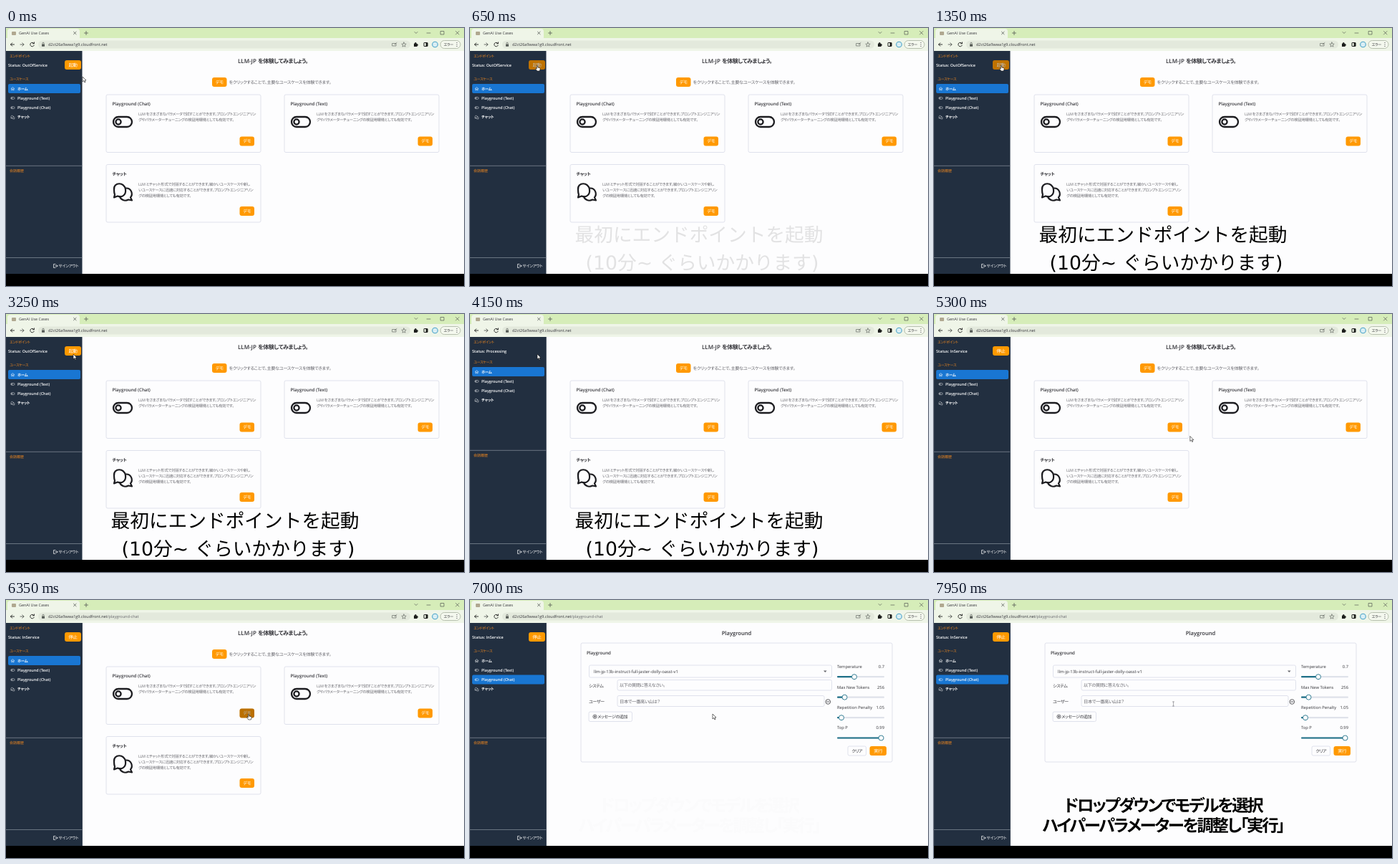
These frames come from a looping animation (640 by 360 pixels, 8 s). An HTML page:

```html
<!DOCTYPE html>
<html lang="ja">
<head>
<meta charset="utf-8">
<title>LLM demo</title>
<style>
html, body { margin: 0; width: 100%; height: 100%; overflow: hidden; background: #000; }
svg { display: block; width: 640px; height: 360px; }
text { font-family: 'Open Sans', 'Noto Sans CJK JP', sans-serif; text-rendering: geometricPrecision; white-space: pre; }
.j { font-feature-settings: 'palt'; letter-spacing: -.06em; }
.b { font-weight: 600; }
.m { text-anchor: middle; }
.e { text-anchor: end; }
.cap text { fill: #000; stroke: #fff; stroke-width: 2.5px; stroke-linejoin: round; paint-order: stroke; text-anchor: middle; }
.wide text { font-family: 'DejaVu Sans', 'Noto Sans CJK JP', sans-serif; }
.tight text { font-weight: 700; letter-spacing: -.1em; }
</style>
</head>
<body>
<svg id="stage" viewBox="0 0 640 360"></svg>
<script>
const LOOP = 8000;
const INK = '#333338', GREY = '#66666c', EDGE = '#d9dbe8', ORANGE = '#ff9900', PAPER = '#fdfdfe';
const NAVY = '#222f40', BLUE = '#1976d2', TEAL = '#1f7088', HEADING = '#f58a1e';

// Drawing helpers
const text = (x, y, s, size, fill = INK, cls = '') =>
  `<text x="${x}" y="${y}" font-size="${size}" fill="${fill}" class="${cls}">${s}</text>`;
const rect = (x, y, w, h, fill, r = 0, extra = '') =>
  `<rect x="${x}" y="${y}" width="${w}" height="${h}" rx="${r}" fill="${fill}" ${extra}/>`;
const box = (x, y, w, h, r = 2) => rect(x, y, w, h, 'none', r, `stroke="${EDGE}" stroke-width=".8"`);
const line = (d, color = INK, w = 1) =>
  `<path d="${d}" fill="none" stroke="${color}" stroke-width="${w}" stroke-linecap="round" stroke-linejoin="round"/>`;
const circle = (x, y, r, fill, extra = '') => `<circle cx="${x}" cy="${y}" r="${r}" fill="${fill}" ${extra}/>`;
const group = (id, body, extra = '') => `<g id="${id}" ${extra}>${body}</g>`;
const at = (x, y, k, body) => `<g transform="translate(${x} ${y}) scale(${k})">${body}</g>`;
const button = (x, y, w, label) =>
  rect(x, y, w, 13, ORANGE, 3) + text(x + w / 2, y + 8.9, label, 6.4, '#fff', 'j m');
const shade = (id, x, y, w) => rect(x, y, w, 13, '#000', 3, `id="${id}" opacity="0"`);

// Icons, drawn on a 28 x 28 grid
const toggle = c =>
  rect(1, 7, 26, 14, 'none', 7, `stroke="${c}" stroke-width="2.3"`) +
  circle(8, 14, 3.6, 'none', `stroke="${c}" stroke-width="2.3"`);
const bubbles = c =>
  line('M3 18 L2 22 L7 20 C13 23 19 18 18 11 C17 0 1 0 2 11 C2 14 2 16 3 18 Z', c, 2.2) +
  line('M19 9 C26 9 29 17 25 22 L27 26 L22 25 C17 28 11 25 10 20.5', c, 2.2);
const house = c => line('M3 14 L14 4 L25 14 M6 12 V25 H11 V17 H17 V25 H22 V12', c, 2.6);

function browser() {
  const c = '#555a55', dark = '#1c1e1c', bar = '#eff5e8';
  return rect(0, 0, 640, 32, '#d6edb9') +
    rect(2, 1, 101, 16, bar, 4) + rect(0, 14, 640, 18, bar) +
    rect(8, 5, 6, 5, '#b0a890', 1) + text(18, 9.4, 'GenAI Use Cases', 5.4) +
    line('M94.5 5.2 l3.6 3.6 m0 -3.6 l-3.6 3.6 M109.5 7 h5 m-2.5 -2.5 v5', c, .8) +
    line('M571 5.5 l2 2 l2 -2 M588 7 h5 M607.5 4.5 h4.5 v4.5 h-4.5 Z M628.5 4.5 l4.5 4.5 m0 -4.5 l-4.5 4.5', c, .7) +
    line('M11.5 23 h-5 m2.2 -2.2 l-2.2 2.2 l2.2 2.2', dark, .9) +
    line('M20 23 h5 m-2.2 -2.2 l2.2 2.2 l-2.2 2.2', c, .9) +
    line('M39 21.5 A2.8 2.8 0 1 0 39.2 24.2 M39.4 19.8 v2 h-2', dark, .9) +
    rect(45, 17.5, 520, 11, '#e3e9dc', 5.5) +
    rect(50, 22.4, 4, 3.4, c, .5) + line('M50.9 22 v-.7 a1.1 1.1 0 0 1 2.2 0 v.7', c, .7) +
    `<text x="59" y="25" font-size="5.5" fill="${INK}">d2ct26a9wwa1g9.cloudfront.net` +
    `<tspan id="path" fill="${GREY}">/playground-chat</tspan></text>` +
    line('M540 21.5 h5 v3.5 h-5 Z m3 1.5 l3 -2.5', c, .6) +
    line('M556 20 l.9 2.1 l2.3 .2 l-1.8 1.5 l.6 2.3 l-2 -1.2 l-2 1.2 l.6 -2.3 l-1.8 -1.5 l2.3 -.2 Z', c, .6) +
    rect(570, 21.5, 4.6, 4.5, dark, .6) + circle(572.3, 21.2, 1.1, dark) + circle(574.8, 23.7, 1.1, dark) +
    rect(584, 20.5, 5, 5, 'none', .4, `stroke="${dark}"`) + rect(586.7, 20.5, 2.5, 5, dark) +
    circle(599.5, 23, 3.8, '#d9eef4', 'stroke="#4aa3c8" stroke-width="1.1"') +
    rect(607, 17.5, 28, 11, '#f4f8ee', 5.5, 'stroke="#a9b3a0" stroke-width=".8"') +
    text(611.5, 25, 'エラー', 5.2, INK, 'j') + [20.5, 23, 25.5].map(y => circle(630, y, .6, INK)).join('');
}

function sidebar(id, status, label) {
  const dy = label ? 0 : -4, half = dy / 2;
  const icons = [house, toggle, toggle, bubbles];
  const items = ['ホーム', 'Playground (Text)', 'Playground (Chat)', 'チャット'];
  return group(id,
    rect(0, 32, 106.5, 311, NAVY) +
    text(5, 40.8, 'エンドポイント', 5, HEADING, 'j') +
    text(3, 53.6, status, 5.5, '#fff', 'b') +
    (label ? button(82, 45, 23, label) : '') +
    text(5, 73.2 + dy, 'ユースケース', 5, HEADING, 'j') +
    rect(3, 78 + dy, 101, 13, BLUE, 2, 'class="mark"') +
    items.map((s, i) => at(6.6, 81.8 + dy + i * 13.3, .2, icons[i]('#fff')) +
      text(16, 86.5 + dy + i * 13.3, s, 5.4, '#fff', i % 3 ? 'b' : 'j b')).join('') +
    line(`M0 ${192.3 + half} H106`, '#7d8794', .8) +
    text(5, 201 + half, '会話履歴', 5, HEADING) +
    line('M0 320.5 H106', '#7d8794', .8) +
    line('M69 329.5 h-2.5 v5 h2.5 M68.5 332 h3.5 m-1.4 -1.4 l1.4 1.4 l-1.4 1.4', '#fff', .7) +
    text(73.5, 334, 'サインアウト', 5.6, '#fff', 'j'));
}

function card(x, y, title, icon, lines) {
  return box(x, y, 216, 80.5) +
    text(x + 8.5, y + 15.3, title, 6.2, INK, title === 'チャット' ? 'j b' : 'b') +
    at(x + 9, y + 24, 1, icon('#1c1c20')) +
    lines.map((s, i) => text(x + 45, y + 29.3 + i * 8, s, 5.4, GREY, 'j')).join('') +
    button(x + 186.5, y + 58.5, 20.5, 'デモ');
}

function home() {
  const tune = ['LLM をさまざまなパラメータで試すことができます。プロンプトエンジニアリン',
    'グやパラメーターチューニングの検証用環境としても有効です。'];
  const chat = ['LLM とチャット形式で対話することができます。細かいユースケースや新し',
    'いユースケースに迅速に対応することができます。プロンプトエンジニアリン',
    'グの検証用環境としても有効です。'];
  return group('home',
    text(373, 49, '<tspan letter-spacing="0">LLM-JP </tspan>を体験してみましょう。', 8, INK, 'j b m') +
    button(288, 69, 20.5, 'デモ') +
    text(311.5, 77.8, 'をクリックすることで、主要なユースケースを体験できます。', 6.2, GREY, 'j') +
    card(140, 93, 'Playground (Chat)', toggle, tune) +
    card(389, 93, 'Playground (Text)', toggle, tune) +
    card(140, 190.5, 'チャット', bubbles, chat) +
    shade('demoShade', 326.5, 151.5, 20.5));
}

function slider(y, name, value, knob) {
  return text(513, y, name, 5.8) + text(579, y, value, 5.8, INK, 'e') +
    rect(513, y + 11.1, 66, 2.2, '#dfe2ea', 1.1) +
    rect(513, y + 11.1, knob - 513, 2.2, TEAL, 1.1) +
    circle(knob, y + 12.2, 3.5, '#fff', `stroke="${TEAL}" stroke-width=".9"`);
}

function playground() {
  return group('playground',
    text(372.5, 49.3, 'Playground', 7.6, INK, 'b m') +
    box(155, 60, 435, 166) + text(163, 76.3, 'Playground', 6.2, INK, 'b') +
    box(166.5, 91, 339, 17) + text(173, 101.5, 'llm-jp-13b-instruct-full-jaster-dolly-oasst-v1', 5.9) +
    `<path d="M494 98.5 h4.6 l-2.3 2.6 Z" fill="${GREY}"/>` +
    text(166, 122, 'システム', 6, INK, 'j') + box(206, 111.5, 299.5, 14.5) +
    text(209, 121.4, '以下の質問に答えなさい。', 6.1, GREY, 'j') +
    text(166, 144, 'ユーザー', 6, INK, 'j') + box(206, 133.5, 289, 15) +
    text(209, 143.8, '日本で一番高い山は？', 6.3, GREY, 'j') +
    circle(500.3, 142, 3.3, 'none', `stroke="${INK}" stroke-width=".8"`) + line('M498.7 142 h3.2', INK, .8) +
    box(166, 156, 60.5, 13.5) +
    circle(174.5, 162.7, 2.6, 'none', `stroke="${INK}" stroke-width=".7"`) + line('M173.2 162.7 h2.6 m-1.3 -1.3 v2.6', INK, .7) +
    text(178, 165, 'メッセージの追加', 6, INK, 'j') +
    slider(95, 'Temperature', '0.7', 537) + slider(123.5, 'Max New Tokens', '256', 523.5) +
    slider(152, 'Repetition Penalty', '1.05', 519) + slider(180.3, 'Top P', '0.99', 574.5) +
    box(528, 204, 25.5, 13) + text(540.8, 213, 'クリア', 6, INK, 'j m') +
    button(558.5, 204, 23.5, '実行'));
}

const pointers =
  group('arrow', '<path d="M0 0 V7 L1.7 5.5 L2.9 8 L4 7.5 L2.9 5.1 L5 5 Z" fill="#fff" stroke="#111" stroke-width=".6"/>') +
  group('hand', '<path d="M-.7 .6 Q0 -.4 .7 .6 V3 L3.6 3.8 Q4.3 4.2 4 5.4 L3.3 8 H-.2 L-2.4 5 Q-2.4 4 -1.6 4.3 L-.7 5 Z" fill="#fff" stroke="#111" stroke-width=".6"/>') +
  group('beam', line('M-1.2 0 H1.2 M0 0 V6 M-1.2 6 H1.2', '#77777c', .6));

const caption = (id, cls, size, lines) => group(id,
  lines.map(([s, x, y, c]) => text(x, y, s, size, '', c)).join(''), `class="cap ${cls}"`);

document.getElementById('stage').innerHTML =
  rect(0, 0, 640, 343, PAPER) + browser() + home() + playground() +
  sidebar('stopped', 'Status: OutOfService', '起動') +
  sidebar('starting', 'Status: Processing', '') +
  sidebar('running', 'Status: InService', '停止') +
  shade('startShade', 82, 45, 23) + rect(0, 343, 640, 17, '#000') +
  caption('intro', 'wide', 26.7, [['最初にエンドポイントを起動', 320, 298], ['(10分~ ぐらいかかります)', 324.5, 337]]) +
  caption('tuning', 'tight', 23.4, [['ドロップダウンでモデルを選択', 320, 294.5, 'j'], ['ハイパーパラメーターを調整し「実行」', 320, 323, 'j']]) +
  group('pointer', pointers);

const $ = id => document.getElementById(id);
const ramp = (t, a, b) => Math.min(1, Math.max(0, (t - a) / (b - a)));
const ease = k => k * k * (3 - 2 * k);
const fade = (id, v) => $(id).setAttribute('opacity', v);
const show = (id, on) => { $(id).style.display = on ? '' : 'none'; };
const marks = document.querySelectorAll('.mark');

function pointerAt(t) {
  const glide = (a, b, x0, y0, x1, y1) => {
    const k = ease(ramp(t, a, b));
    return [x0 + (x1 - x0) * k, y0 + (y1 - y0) * k];
  };
  if (t < 2200) return [t < 300 ? 'arrow' : 'hand', ...glide(50, 400, 107, 68, 94, 52)];
  if (t < 4650) return ['arrow', ...glide(2200, 2350, 94, 52, 94, 56)];
  if (t < 6400) return [t < 5800 ? 'arrow' : 'hand', ...glide(4750, 5400, 640, 343, 339, 159)];
  if (t < 7600) return ['arrow', 339, 159];
  return ['beam', ...glide(7600, 7650, 337, 150, 334.5, 142)];
}

function draw(t) {
  const dissolve = ramp(t, 4200, 4600), onChat = t >= 6400;
  show('home', !onChat);
  show('playground', onChat);
  show('path', t >= 6200);
  show('starting', t >= 3450);
  fade('running', dissolve);
  marks.forEach(m => m.setAttribute('transform', `translate(0 ${onChat ? 26.6 : 0})`));

  fade('startShade', .25 * ramp(t, 250, 400) * (1 - ramp(t, 2200, 2350)));
  fade('demoShade', .27 * ramp(t, 5750, 5950));
  fade('intro', ramp(t, 600, 1100) * (1 - dissolve));
  fade('tuning', ramp(t, 7000, 7450));

  const [shape, x, y] = pointerAt(t);
  for (const s of ['arrow', 'hand', 'beam']) show(s, s === shape);
  $('pointer').setAttribute('transform', `translate(${x} ${y})`);
  fade('pointer', t < 4650 ? 1 - dissolve : 1);
}

const start = performance.now();
(function tick() {
  draw((performance.now() - start) % LOOP);
  requestAnimationFrame(tick);
})();
</script>
</body>
</html>
```
